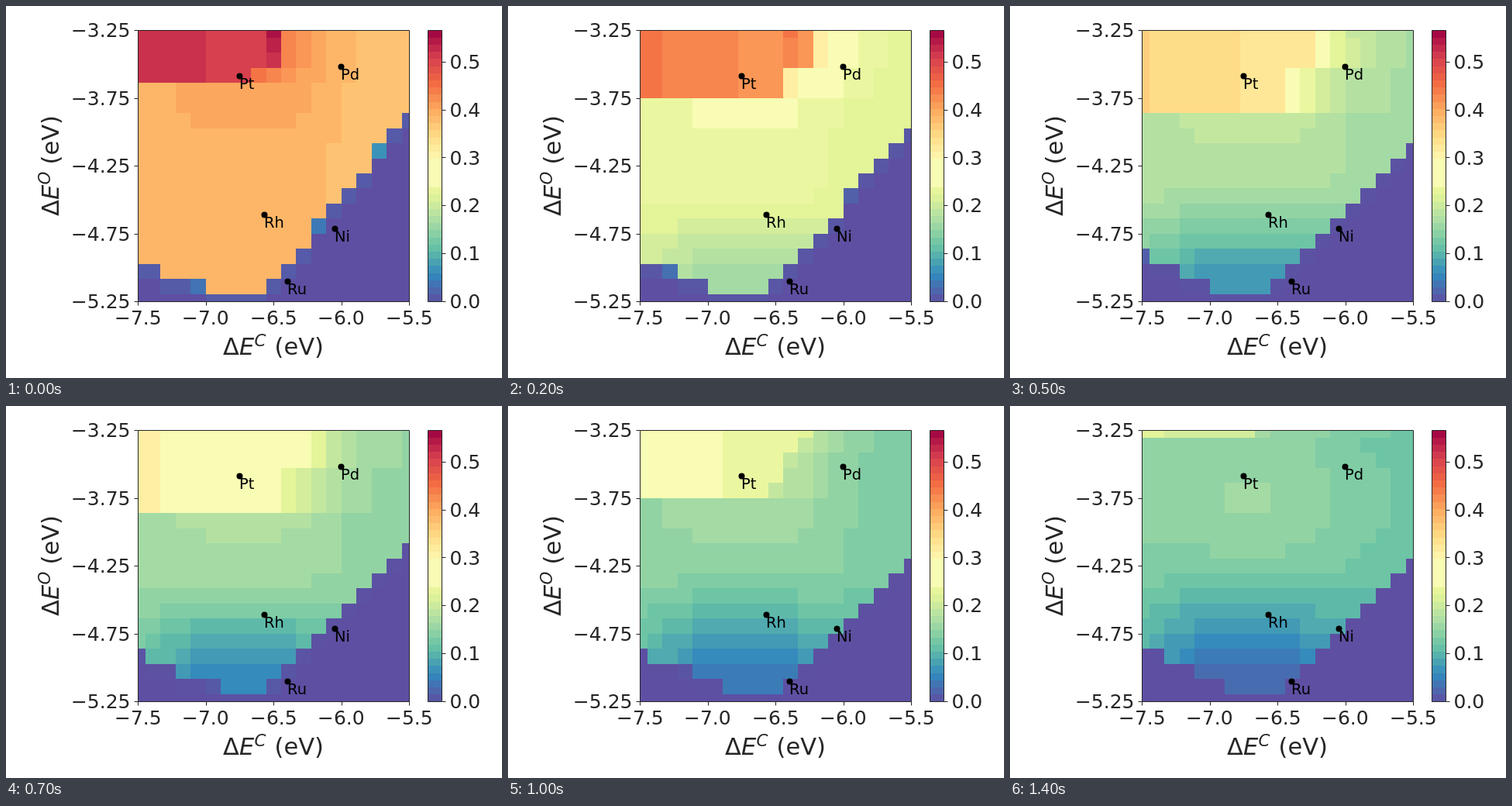
Write an HTML page with a canvas that moves like this. It is 640x480 px and loops after 1500 ms.

```html
<!DOCTYPE html>
<html lang="en">
<head>
<meta charset="utf-8">
<title>Activity map</title>
<style>
html, body { margin: 0; width: 100%; height: 100%; overflow: hidden; background: #fff; }
canvas, svg { position: absolute; left: 0; top: 0; width: 640px; height: 480px; }
text { font-family: "DejaVu Sans", sans-serif; font-size: 25px; fill: #262626; }
.axis { font-size: 30.5px; }
.math { font-style: italic; }
.sup { font-size: 21.4px; }
.metal { font-size: 19.44px; fill: #000; }
.line { fill: none; stroke: #262626; stroke-width: 1; }
</style>
</head>
<body>
<canvas id="map" width="640" height="480"></canvas>
<svg id="chart" viewBox="0 0 640 480"></svg>
<script>
const N = 19, LEFT = 170.5, TOP = 31.5, SIZE = 350;
const VMAX = 0.566, BANDS = 38, BAND = VMAX / BANDS;
const STEP = 100, LOOP = 1500;
const stops = ['5e4fa2', '3288bd', '66c2a5', 'abdda4', 'e6f598', 'ffffbf',
  'fee08b', 'fdae61', 'f46d43', 'd53e4f', '9e0142']
  .map(h => [0, 2, 4].map(i => parseInt(h.slice(i, i + 2), 16)));

const clamp = x => Math.min(1, Math.max(0, x));
const smooth = x => (x = clamp(x)) * x * (3 - 2 * x);
const decay = (t, span) => Math.exp(-t / span);

// row where a column runs empty: a rising left edge, a falling diagonal
function border(c, t) {
  const left = 16.2 + .42 * c - .0005 * t;
  const diagonal = 13.9 + .00126 * t - (1 + .23 * decay(t, 450)) * (c - 12);
  return Math.min(18, left, diagonal);
}

// settling level with a soft hump and a lower right side
function plain(c, r, t) {
  const level = .112 + .273 / (1 + t / 165);
  const hump = .018 * Math.exp(-((c - 7) ** 2) / 30 - ((r - 4.5) ** 2) / 9);
  return level + hump - .015 * clamp((c - 11) / 4);
}

// how far the hollow at the bottom has sunk
function hollow(c, r, t) {
  const start = 10.5 - t / 400;
  const shape = 1 - .5 * clamp((4 - c) / 4) - .5 * clamp((c - 10) / 4);
  return .11 * clamp((t - 100) / 150) * shape * smooth((r - start) / (17.5 - start));
}

// high plateau at the top left, fading out to the right
function plateau(c, r, t, low) {
  const rows = Math.floor(4.2 + .009 * t - 8e-6 * t * t);
  if (r >= rows) return low;
  const late = Math.max(0, t - 900) / 150;
  const end = 12 - 2.5 * decay(t, 120) - (r > 2 ? 2 : 0) - late * (1.4 + .3 * (r % 3) ** 3 * (late > 0));
  const high = .162 + .365 * decay(t, 770) - .0028 * c;
  if (c >= end) return low + (high - low) * .5 * decay(c - end, 2.5);
  const onRidge = r < 3 && Math.abs(c - 9 - t / 200) < .8;
  return high + (onRidge ? .05 * clamp(1 - t / 400) / (1 + r / 2) : 0);
}

function valueAt(c, r, t) {
  const edge = border(c, t), first = Math.floor(edge);
  if (r > first) return 0;
  if (r === first) return (.012 + .3 * Math.max(0, edge - first - .8)) * decay(t, 400);
  const v = plateau(c, r, t, plain(c, r, t)) - hollow(c, r, t);
  return Math.round(v / BAND) * BAND;
}

function shade(v) {
  let t = clamp(v / VMAX);
  if (t > .433 && t < .539) t = .473;
  const i = Math.min(9, Math.floor(t * 10)), u = t * 10 - i;
  return `rgb(${stops[i].map((a, j) => Math.round(a + (stops[i + 1][j] - a) * u))})`;
}

const ctx = document.getElementById('map').getContext('2d');
const side = (start, i) => Math.round(start + SIZE * clamp((i - .5) / (N - 1)));

function drawMap(time) {
  for (let r = 0; r < N; r++) {
    const y = side(TOP - .2, r), h = side(TOP - .2, r + 1) - y;
    for (let c = 0; c < N; c++) {
      const x = side(LEFT - .2, c);
      ctx.fillStyle = shade(valueAt(c, r, time));
      ctx.fillRect(x, y, side(LEFT - .2, c + 1) - x, h);
    }
  }
}

function drawBar() {
  const y = i => Math.round(TOP + SIZE * (1 - i / BANDS));
  for (let i = 0; i < BANDS; i++) {
    ctx.fillStyle = shade((i + .5) * BAND);
    ctx.fillRect(544, y(i + 1), 18, y(i) - y(i + 1));
  }
}

function buildChart() {
  const minus = v => '\u2212' + v;
  const crisp = v => Math.floor(v) + .5;
  const text = (x, y, s, cls = '', anchor = 'start') =>
    `<text x="${x}" y="${y}" class="${cls}" text-anchor="${anchor}">${s}</text>`;
  const line = d => `<path class="line" d="${d}"/>`;
  const label = (sup, place) => `<g transform="${place}">` +
    text(0, 0, '\u0394', 'axis') + text(20.9, 0, 'E', 'axis math') +
    text(40.5, -11, sup, 'sup math') + text(66.5, 0, '(eV)', 'axis') + '</g>';
  let out = line(`M${LEFT} ${TOP}h${SIZE}v${SIZE}h-${SIZE}z`) +
    line(`M544.5 ${TOP}h18v${SIZE}h-18z`);
  for (let i = 0; i < 5; i++) {
    const p = i * SIZE / 4;
    out += line(`M${crisp(LEFT + p)} ${TOP + SIZE}v5`) + line(`M${LEFT} ${crisp(TOP + p)}h-5`);
    out += text(Math.round(139.8 + p), 411, minus((7.5 - i / 2).toFixed(1)));
    out += text(160.5, Math.round(TOP + p + 8.6), minus((3.25 + i / 2).toFixed(2)), '', 'end');
  }
  for (let i = 0; i < 6; i++) {
    const y = TOP + SIZE * (1 - i / 10 / VMAX);
    out += line(`M562.5 ${crisp(y)}h5`) + text(572.5, Math.round(y + 8.6), (i / 10).toFixed(1));
  }
  out += label('C', 'translate(280 450)') + label('O', 'translate(68 271) rotate(-90)');
  for (const [name, x, y] of [['Pt', 301, 90], ['Pd', 432, 78], ['Rh', 333, 269],
    ['Ni', 424, 287], ['Ru', 363, 355]])
    out += `<circle cx="${x + .5}" cy="${y + .5}" r="4"/>` + text(x, y + 17, name, 'metal');
  document.getElementById('chart').innerHTML = out;
}

let shown = -1;
function tick() {
  const time = Math.floor(performance.now() % LOOP / STEP) * STEP;
  if (time !== shown) drawMap(shown = time);
  requestAnimationFrame(tick);
}

buildChart();
drawBar();
tick();
</script>
</body>
</html>
```
